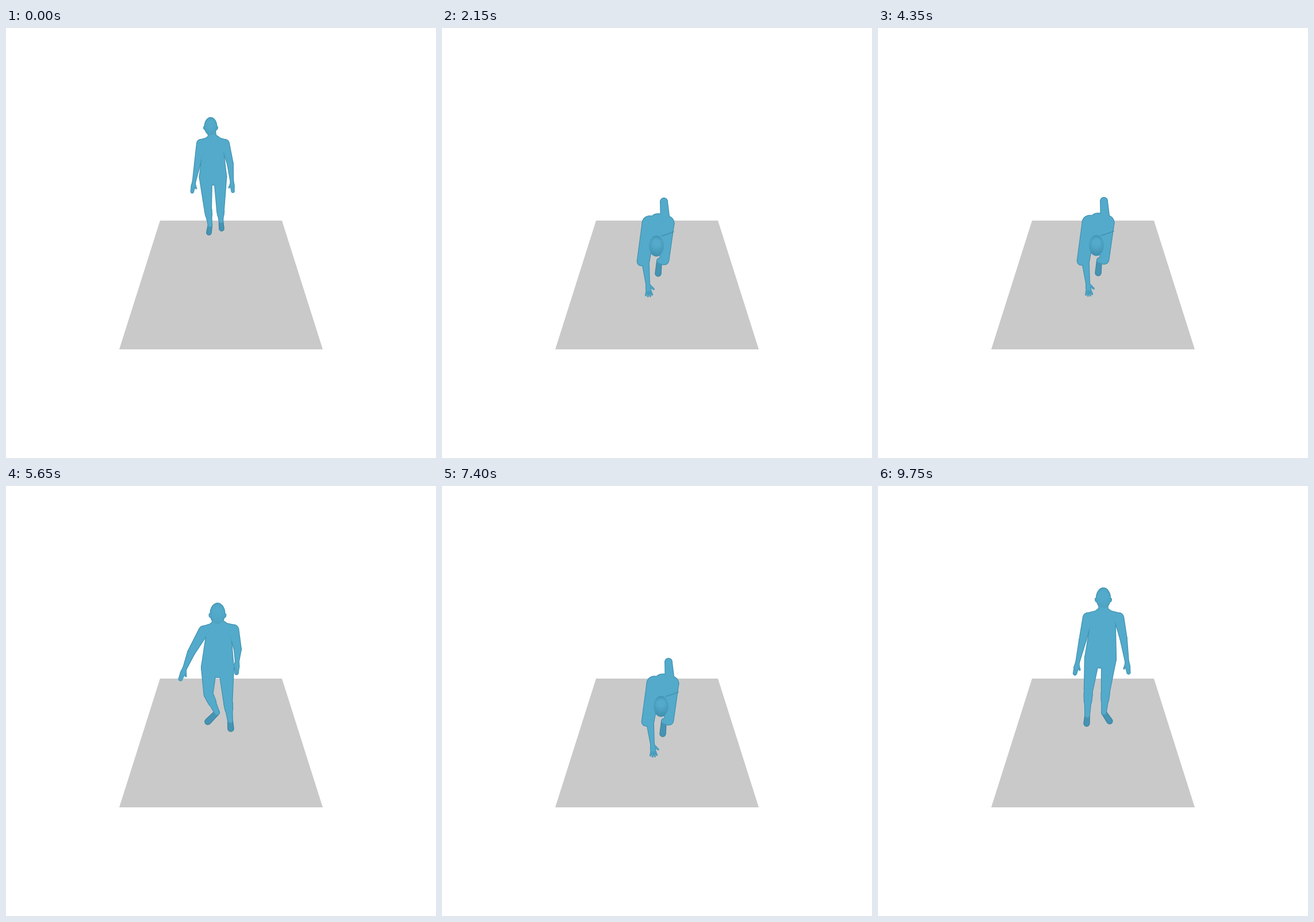
Recreate the animation shown at these times as an HTML page with a canvas. Size 748 by 748 pixels, loop 9800 ms.

```html
<!DOCTYPE html>
<html>
<head>
<meta charset="utf-8">
<style>
html, body { margin: 0; width: 100%; height: 100%; overflow: hidden; background: #fff; }
canvas { display: block; }
</style>
</head>
<body>
<canvas id="stage" width="748" height="748"></canvas>
<script>
const ctx = document.getElementById('stage').getContext('2d');
const LOOP = 9800, STEP = 50;

// Each pose: scale, then x,y of head; right shoulder, elbow, wrist; left shoulder,
// elbow, wrist; pelvis; right knee, ankle, toe; left knee, ankle, toe.
const far = [.84, 356,171, 339,201, 333,236, 327,268, 381,201, 390,236, 393,267,
  360,259, 351,312, 355,343, 353,356, 373,315, 374,336, 375,349];
const bent = [.98, 373,379, 360,364, 354,408, 358,445, 389,346, 386,302, 387,318,
  376,340, 347,406, 352,395, 356,403, 387,404, 378,405, 376,427];
const reach = [1, 368,222, 344,252, 322,290, 311,317, 396,250, 403,284, 402,305,
  368,316, 352,362, 367,394, 351,410, 386,373, 390,408, 391,422];
const stride = [1, 371,214, 346,246, 333,277, 320,318, 403,240, 414,275, 423,311,
  378,306, 361,372, 362,414, 357,431, 394,362, 391,393, 400,408];
const stand = [.97, 392,195, 365,229, 356,268, 347,307, 419,229, 427,265, 433,305,
  387,300, 366,355, 364,399, 363,413, 396,355, 393,394, 403,409];

const lerp = (a, b, u) => a + (b - a) * u;
const mixPose = (p, q, u) => p.map((v, i) => lerp(v, q[i], u));
const shift = (p, dx, dy) => p.map((v, i) => i ? v + (i % 2 ? dx : dy) : v);
const between = (a, b, u) => ({ x: lerp(a.x, b.x, u), y: lerp(a.y, b.y, u) });

const keys = [
  [0, far],
  [950, shift(mixPose(stand, reach, .5), -8, 0)],
  [1950, bent],
  [2150, bent],
  [4350, shift(bent, 7, -1)],
  [5250, reach],
  [5650, reach],
  [6600, shift(bent, 7, 5)],
  [7450, shift(bent, 8, 4)],
  [8300, stride],
  [8980, shift(mixPose(stand, stride, .25), 10, 0)],
  [9750, stand]
];

function poseAt(t) {
  let i = 0;
  while (i < keys.length - 2 && t > keys[i + 1][0]) i++;
  const [t0, p] = keys[i], [t1, q] = keys[i + 1];
  const u = Math.min(1, (t - t0) / (t1 - t0));
  return mixPose(p, q, i ? u * u * (3 - 2 * u) : u);
}

function limb(a, b, ra, rb) {
  const angle = Math.atan2(b.y - a.y, b.x - a.x);
  const dist = Math.hypot(b.x - a.x, b.y - a.y);
  const turn = Math.acos(Math.max(-1, Math.min(1, (ra - rb) / (dist || 1))));
  ctx.beginPath();
  ctx.arc(a.x, a.y, ra, angle + turn, angle - turn + Math.PI * 2);
  ctx.arc(b.x, b.y, rb, angle - turn, angle + turn);
  ctx.fill();
}

function drawBody(pose, inset, color, footColor, spread) {
  const s = pose[0];
  const [head, shR, elR, wrR, shL, elL, wrL, pelvis, knR, anR, toR, knL, anL, toL] =
    Array.from({ length: 14 }, (_, i) => ({ x: pose[1 + 2 * i], y: pose[2 + 2 * i] }));
  const part = (a, b, ra, rb) =>
    limb(a, b, Math.max(.7, ra * s - inset), Math.max(.7, rb * s - inset));

  function leg(side, knee, ankle, toe) {
    const hip = { x: pelvis.x + side * 15 * s, y: pelvis.y };
    ctx.fillStyle = footColor;
    part(ankle, toe, 5, 5.8);
    ctx.fillStyle = color;
    part(knee, ankle, 8, 5);
    part(between(knee, ankle, .15), between(knee, ankle, .45), 8.5, 7.5);
    part(hip, knee, 14, 8.5);
    return hip;
  }

  function arm(side, shoulder, elbow, wrist) {
    part(shoulder, elbow, 9.5, 7);
    part(elbow, wrist, 7, 4);
    const angle = Math.atan2(wrist.y - elbow.y, wrist.x - elbow.x);
    const away = (p, turn, len) => ({
      x: p.x + Math.cos(angle + turn) * len * s,
      y: p.y + Math.sin(angle + turn) * len * s
    });
    const palm = away(wrist, 0, 9);
    part(wrist, palm, 4, 5);
    for (let f = -1.5; f <= 1.5; f++)
      part(away(palm, f * .7, 3), away(palm, f * spread, 14 - Math.abs(f)), 2, 1.5);
    part(wrist, away(wrist, side * (.4 + spread), 14), 2.5, 1.7);
  }

  const hipR = leg(-1, knR, anR, toR), hipL = leg(1, knL, anL, toL);
  const chestR = between(shR, shL, .28), chestL = between(shR, shL, .72);
  const chest = between(shR, shL, .5);
  const neck = { x: chest.x, y: chest.y - 6 * s };
  part(chestR, hipR, 10, 14);
  part(chestL, hipL, 10, 14);
  part(chest, pelvis, 19, 18);
  part(neck, shR, 10, 9);
  part(neck, shL, 10, 9);
  part(neck, head, 9, 9);
  arm(-1, shR, elR, wrR);
  arm(1, shL, elL, wrL);

  for (const side of [-1, 1]) {
    const ear = { x: head.x + side * 13 * s, y: head.y + 2 * s };
    part(ear, { x: ear.x, y: ear.y + 3 * s }, 2.5, 2);
  }
  ctx.beginPath();
  ctx.ellipse(head.x, head.y, 13.5 * s - inset, 19 * s - inset, 0, 0, Math.PI * 2);
  ctx.fill();
  return { head, s, shL, shR };
}

function drawDetails({ head, s, shL }, fold) {
  const shade = ctx.createRadialGradient(head.x, head.y - 5 * s, 6 * s, head.x, head.y, 19 * s);
  shade.addColorStop(0, 'rgba(45,115,145,0)');
  shade.addColorStop(1, `rgba(45,115,145,${.15 + .35 * fold})`);
  ctx.fillStyle = shade;
  ctx.beginPath();
  ctx.ellipse(head.x, head.y, 13 * s, 18 * s, 0, 0, Math.PI * 2);
  ctx.fill();
  ctx.strokeStyle = `rgba(45,115,145,${.6 * fold})`;
  ctx.lineWidth = 1.2;
  ctx.beginPath();
  ctx.moveTo(head.x + 8, head.y - 17);
  ctx.quadraticCurveTo(shL.x, shL.y + 14, shL.x + 15, shL.y + 8);
  ctx.stroke();
}

function render(t) {
  ctx.fillStyle = '#fff';
  ctx.fillRect(0, 0, 748, 748);
  ctx.fillStyle = '#c9c9c9';
  ctx.beginPath();
  ctx.moveTo(268, 335);
  ctx.lineTo(480, 335);
  ctx.lineTo(551, 559);
  ctx.lineTo(197, 559);
  ctx.fill();

  const pose = poseAt(t);
  if (t < 950) {
    const swing = Math.sin(t / 950 * Math.PI * 3);
    const liftR = 9 * Math.max(0, -swing), liftL = 9 * Math.max(0, swing);
    for (const i of [20, 22]) pose[i] -= liftR;
    for (const i of [26, 28]) pose[i] -= liftL;
  }
  const fold = Math.max(0, Math.min(1, (pose[2] - pose[16] + 90) / 125));
  const spread = .12 + .2 * fold;
  drawBody(pose, 0, '#3e8eae', '#397f9c', spread);
  drawDetails(drawBody(pose, 1.1, '#53aaca', '#4594b3', spread), fold);
}

function tick() {
  render(Math.floor(performance.now() % LOOP / STEP) * STEP);
  requestAnimationFrame(tick);
}
tick();
</script>
</body>
</html>
```
